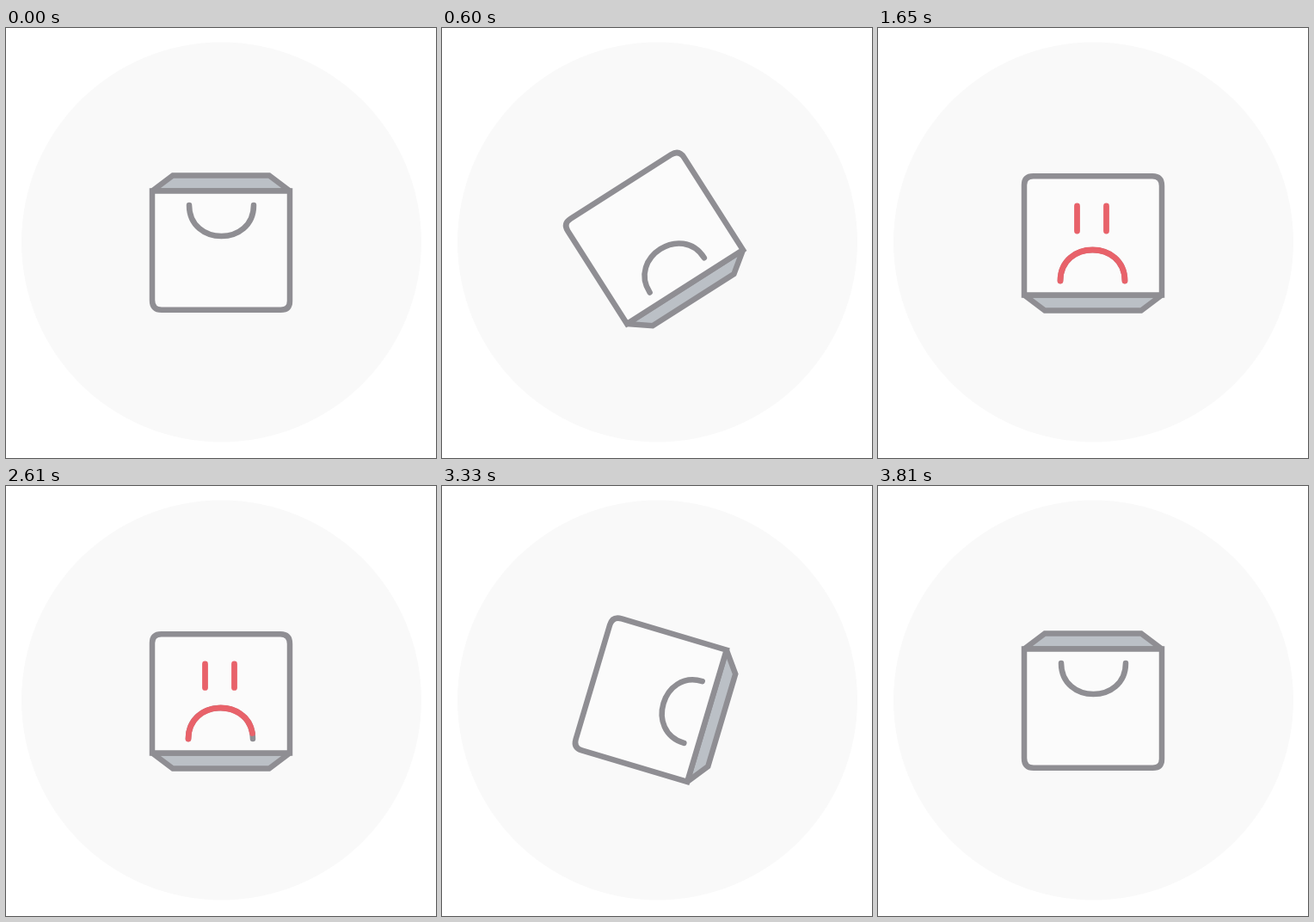
Write an HTML page that moves like this. It is 500 by 500 pixels and loops after 4530 ms.

```html
<!DOCTYPE html>
<html lang="en">
<head>
<meta charset="utf-8">
<title>Bag</title>
<style>
  html, body { margin: 0; height: 100%; overflow: hidden; background: #fff; }
  svg { display: block; width: 100%; height: 100%; }
  #bag { stroke: #8f8e93; stroke-width: 6.5; fill: none; }
  #face { stroke: #e8626a; stroke-width: 6.8; }
  .round { stroke-linecap: round; }
</style>
</head>
<body>
<svg viewBox="0 0 500 500">
  <circle cx="250.5" cy="249" r="232.5" fill="#f9f9f9"/>
  <g id="bag">
    <path d="M170 189.5L194 171.5H306L330 189.5Z" fill="#bbc0c6" stroke-miterlimit="2"/>
    <path d="M170 189.5H330V317.5Q330 327.8 319.500 327.800H181Q170 327.800 170 316.500Z" fill="#fbfbfb"/>
    <path class="round" d="M288 206C288 254 213 254 213 206"/>
    <g id="face" class="round">
      <path pathLength="1" d="M288 206C288 254 213 254 213 206"/>
      <path pathLength="1" d="M268.500 293V264"/>
      <path pathLength="1" d="M234.500 293V264"/>
    </g>
  </g>
</svg>
<script>
const LOOP = 4530, STEP = 30;
const bag = document.getElementById('bag');
const face = document.getElementById('face');

const progress = (t, from, to) => Math.min(1, Math.max(0, (t - from) / (to - from)));

// Cubic bezier easing with flat ends: control points (a, 0) and (b, 1).
function ease(x, a, b) {
  let lo = 0, hi = 1;
  for (let i = 0; i < 24; i++) {
    const s = (lo + hi) / 2, r = 1 - s;
    if (3 * r * r * s * a + 3 * r * s * s * b + s * s * s < x) lo = s;
    else hi = s;
  }
  return lo * lo * (3 - 2 * lo);
}

function draw(time) {
  const t = Math.floor((time % LOOP) / STEP) * STEP;
  const flip = ease(progress(t, 0, 900), 0.69, 0.39);
  const back = ease(progress(t, 2760, 3810), 0.77, 0.43);
  bag.setAttribute('transform', `rotate(${180 * (flip - back)} 250 250)`);

  const shown = progress(t, 1080, 1620) - progress(t, 2580, 3120);
  face.style.display = shown > 0 ? '' : 'none';
  face.style.strokeDasharray = `${shown} 2`;
}

const start = performance.now();
function tick() {
  draw(performance.now() - start);
  requestAnimationFrame(tick);
}
tick();
</script>
</body>
</html>
```
